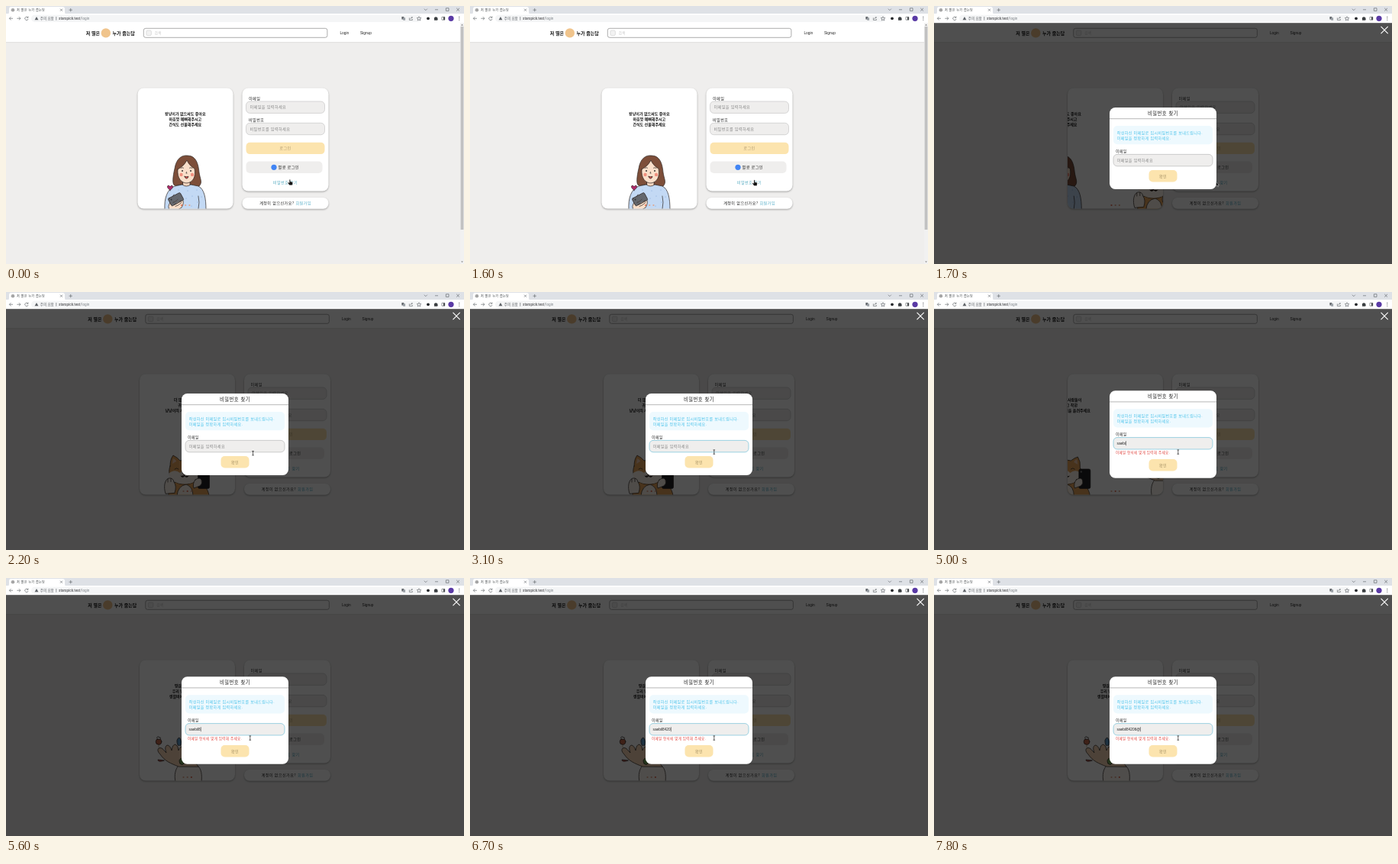
An HTML page that plays this animation: 600 px wide and 338 px high, repeating every 8 s.

```html
<!DOCTYPE html>
<html lang="ko">
<head>
<meta charset="utf-8">
<title>Password reset</title>
<style>
html, body { margin: 0; width: 100%; height: 100%; overflow: hidden; background: #efeeed; }
svg { display: block; width: 100%; height: 100%; }
text { font-family: "Noto Sans CJK KR", "Noto Sans CJK", "Noto Sans", sans-serif; letter-spacing: .08em; white-space: pre; }
.latin { font-family: "Liberation Sans", Arial, sans-serif; letter-spacing: 0; }
.ui { font-family: Roboto, "Noto Sans CJK KR", "Noto Sans CJK", sans-serif; letter-spacing: 0; }
.tight { letter-spacing: 0; font-weight: 700; }
.card { fill: #fff; filter: drop-shadow(0 1px 1.2px rgba(0, 0, 0, .32)); }
.bar { fill: #fff; filter: drop-shadow(0 .6px 1px rgba(0, 0, 0, .14)); }
.ink { stroke: #2b2422; stroke-width: .7; stroke-linejoin: round; stroke-linecap: round; }
.line { fill: none; stroke: #5f6368; stroke-width: .65; }
</style>
</head>
<body>
<svg id="stage" viewBox="0 0 600 338" preserveAspectRatio="none"></svg>
<script>
const LOOP = 8000;
const CARD_W = 125;
const EMAIL = 'saebil84206@';
// Time at which each character of EMAIL appears
const KEYS = [3600, 4400, 4600, 4900, 5000, 5500, 5600, 5900, 6300, 6700, 6900, 7800];

const text = (x, mid, size, str, fill = '#222', extra = '') =>
  `<text x="${x}" y="${mid + size * .36}" font-size="${size}" fill="${fill}" ${extra}>${str}</text>`;
const center = (x, mid, size, str, fill, extra = '') =>
  text(x, mid, size, str, fill, `text-anchor="middle" ${extra}`);
const box = (x, y, w, h, r, fill, extra = '') =>
  `<rect x="${x}" y="${y}" width="${w}" height="${h}" rx="${r}" fill="${fill}" ${extra}/>`;
const dot = (x, y, r, fill, extra = '') =>
  `<circle cx="${x}" cy="${y}" r="${r}" fill="${fill}" ${extra}/>`;
const path = (d, fill = 'none', extra = 'class="ink"') => `<path d="${d}" fill="${fill}" ${extra}/>`;
const line = d => path(d, 'none', 'class="line"');
const caption = (x, rows) =>
  rows.map((row, i) => center(x, 141.6 + i * 6.8, 5, row, '#111', 'class="tight"')).join('');

const FIELD = 'stroke="#c8c8c8" stroke-width=".7"';

function browserBar() {
  return box(0, 0, 600, 10.5, 0, '#dee1e6')
    + path('M2 10.5Q4 10.5 4 8V4Q4 1 7 1H74Q77 1 77 4V8Q77 10.5 79 10.5Z', '#fff', '')
    + box(0, 10, 600, 12.2, 0, '#fff')
    + dot(9, 5.3, 2.3, '#a5a5a5')
    + text(14, 5.4, 4.1, '저 별은 누가 줍는담', '#3c4043')
    + line('M71 3.7l3 3m0-3l-3 3M82.5 5.2h4.4m-2.2-2.2v4.4')
    + line('M547.8 3.7l2 2l2-2M562 4.8h4M576.4 2.8h3.6v3.6h-3.6zM590.2 2.8l3.8 3.8m0-3.8l-3.8 3.8')
    + box(33, 11.7, 512, 9.2, 4.6, '#f4f5f6')
    + line('M9 16.3H4.4m2.1-2.1l-2.1 2.1l2.1 2.1M14.4 16.3H19m-2.1-2.1l2.1 2.1l-2.1 2.1')
    + line('M28.6 14.9a2.2 2.2 0 1 0 .5 2M29 13.6v1.7h-1.8')
    + path('M37.6 18.3L40 14l2.4 4.3Z', '#5f6368', '')
    + text(44.8, 16.2, 4.6, '주의 요함', '#5f6368', 'class="ui"')
    + line('M65.8 14v4.6')
    + text(69, 16.2, 4.7, 'starspick.test<tspan fill="#80868b">/login</tspan>', '#303134', 'class="ui"')
    + box(518.4, 14, 2.9, 3.6, .4, '#5f6368') + box(520.2, 15.2, 2.9, 3.6, .4, '#9aa0a6')
    + line('M528.4 15.4v3h4v-1.4M529.8 17q.3-2 2.6-2m-1-1.1l1.1 1.1l-1.1 1.1')
    + line('M541 13.8l.8 1.7l1.9.2l-1.4 1.3l.4 1.9l-1.7-1l-1.7 1l.4-1.9l-1.4-1.3l1.9-.2z')
    + dot(553, 16.3, 1.9, '#26282b')
    + path('M561 15h1.3a.9.9 0 0 1 1.8 0h1.2v1.4a.9.9 0 0 1 0 1.6v.8h-4.3z', '#3c4043', '')
    + line('M571 14.4h3.8v3.8h-3.8z') + box(573, 14.4, 1.8, 3.8, 0, '#3c4043')
    + dot(583, 16.3, 3.6, '#5a3aa5')
    + [14.4, 16.3, 18.2].map(y => dot(593.8, y, .55, '#4d5156')).join('');
}

function header() {
  return box(-5, 22, 610, 25, 0, '#fff', 'class="bar"')
    + text(104.8, 35.4, 6, '저 별은', '#111', 'class="tight"')
    + dot(130.8, 35.4, 6.2, '#f0c48c')
    + text(139.6, 35.4, 6, '누가 줍는담', '#111', 'class="tight"')
    + box(180.3, 29.3, 240.6, 12, 2.6, '#fff', 'stroke="#8a8a8a" stroke-width=".7"')
    + box(183.8, 32, 6.6, 6.6, 1.6, '#f2f2f2', 'stroke="#c4c4c4" stroke-width=".5"')
    + text(194.8, 35.4, 4.4, '검색', '#c4c4c4')
    + text(437.4, 35.3, 4.8, 'Login', '#222', 'class="latin"')
    + text(464, 35.3, 4.8, 'Signup', '#222', 'class="latin"');
}

function woman() {
  const hair = 'M224 235C217 238 218 226 221 213C223 200 230 195 238 196C249 196 252 207 253 218'
    + 'C254 226 258 231 253 236C249 239 244 238 243 234L230 234Z';
  return caption(CARD_W / 2 + 172.3, ['왕냥이가 없으셔도 좋아요', '마음껏 예뻐해주시고', '간식도 선물해주세요'])
    + path(hair, '#7d4e39')
    + path('M232 229h9v7q-4.5 3-9 0z', '#f8d6bf')
    + path('M208 267C207 252 211 240 221 236L231 234Q236 238 242 234L252 236C260 240 262 252 262 267Z', '#c3d9f4')
    + [[226, 241], [238, 242], [250, 241], [244, 249], [256, 250], [236, 252], [251, 257], [243, 262], [212, 252]]
      .map(([x, y]) => dot(x, y, .55, '#7fa3d6')).join('')
    + path('M225 214C224 226 230 232 237 232C245 231 249 224 247 213C243 211 239 207 237 202C234 208 230 211 225 214Z', '#fadfca')
    + dot(229.5, 221, 2.2, '#f0907f') + dot(244, 221, 2.2, '#f0907f')
    + dot(231, 216, .9, '#222') + dot(242, 216, .9, '#222')
    + path('M229 212.3q2-1.3 3.5-.2M240.5 212.1q2-1 3.5.3M236.5 217.5l-.6 1.6h1.1')
    + path('M234 223.3q2.700.8 5 0q-.6 2.800-2.500 2.800t-2.500-2.800z', '#d84a48')
    + path('M252 249q2 8 0 17M220 247q-3 4-4 9')
    + path('M215 241.5C208 236 213 233.5 215 236.7C217 233.5 222 236 215 241.5Z', '#b0286a')
    + path('M213 262C215 255 219 250 226 250C233 251 234 258 230 264L225 267H214Z', '#fadfca')
    + `<g transform="rotate(-28 223 253)">${box(213.5, 247.5, 18, 11, 1.6, '#64676d', 'class="ink"')}${dot(217, 250.5, 1, '#34363a')}</g>`
    + path('M221 260q4-1 8-5M222 262.5q4-1 8-5M219 257.5q3-1 6-4', '#fadfca');
}

function cat() {
  return caption(237.5, ['더 많은 사람들이', '귀엽고 착한', '냥냥이의 사진을 올려주세요'])
    + path('M213 267C212 256 218 249 226 248H248C258 250 265 257 266 267Z', '#e9a65c')
    + path('M224 267Q225 254 236 252Q245 255 245 267Z', '#fff7ec')
    + path('M215 228Q215 219 219 214Q225 217 228 221Q235 219 241 221Q246 217 250 216Q254 222 253 230'
      + 'C258 242 248 252 234 252C220 252 210 242 215 228Z', '#e9a65c')
    + path('M219 218q4 2 4 4l-5 3zM249 219q-4 2-4 4l5 3z', '#f5cdb0', '')
    + path('M213 238Q221 231 228 237Q234 230 240 237Q247 231 255 238C253 247 245 251.500 234 251.500S215 247 213 238Z', '#fff7ec', '')
    + path('M221 232q2.500-2.500 5 0M241 232q2.500-2.500 5 0')
    + path('M231.500 237h5l-2.500 2.500zM234 240v1q-3 3-5 0m5 0q3 3 5 0', '#3a2a26')
    + path('M209 264C206 255 208 246 213 244Q219 243 220 249Q224 254 221 263Z', '#fff7ec')
    + path('M212 245v4M216 244.500v4')
    + box(251.500, 232, 15, 25.500, 2, '#202024', 'class="ink"')
    + dot(254.500, 235.500, 1.200, '#777')
    + path('M248 246q6-4 8 0q2 5-2 8l-8 3q-2-6 2-11z', '#fff7ec');
}

function paw() {
  return caption(237.5, ['병원비도 내주고', '우리 냥이 간식주고', '생활비에도 보태주세요'])
    + path('M222 267C220 258 222 250 226 246H251C256 250 257 258 256 267Z', '#fffaf2')
    + path('M226 247C216 243 208 240 202 231Q197 226 200 223Q204 221 208 227L210 229'
      + 'Q207 221 211 219Q215 219 217 226Q218 218 222 218Q226 220 226 226Q228 220 232 221'
      + 'Q238 228 242 234L252 247Z', '#f8d7b4')
    + path('M200 222v-5', 'none', 'stroke="#eee3cf" stroke-width="2"')
    + dot(200, 214.5, 3.8, '#c96a4d', 'class="ink"')
    + path('M198.5 211q-2-2 0-3q1.5-1 2 1q2-1 2 1t-2 1.5z', '#fff')
    + path('M225 219q-3-8 2-10q4 4 2 10z', '#5f9dcc')
    + path('M228 243q-3-5 2-7q5 2 3 7q-2 3-5 0z', '#79a95b')
    + path('M204 240q-5 1-5-2l8 1z', '#d95b4f');
}

function cards() {
  return box(172.5, 107.5, CARD_W, 158, 8, '#fff', 'class="card"')
    + `<g clip-path="url(#cardClip)"><g id="track"><g>${woman()}</g>`
    + `<g transform="translate(122.5)">${cat()}</g><g transform="translate(247.5)">${paw()}</g></g>`
    + [230, 235.2, 240.4].map(x => dot(x, 261, 1.1, '#e0a58c', 'class="page"')).join('') + '</g>'
    + box(309.5, 107.5, 113, 135, 8, '#fff', 'class="card"')
    + text(318, 121, 5.1, '이메일')
    + box(314.5, 125, 103, 15.4, 5, '#efeeed', FIELD)
    + text(319.5, 132.5, 5.1, '이메일을 입력하세요', '#858585')
    + text(318, 149.4, 5.1, '비밀번호')
    + box(314.5, 153.3, 103, 15.4, 5, '#efeeed', FIELD)
    + text(319.5, 161, 5.1, '비밀번호를 입력하세요', '#858585')
    + box(314.5, 178.7, 103, 15.4, 5, '#fce4ae')
    + center(366, 186.5, 5.1, '로그인', '#b09a70')
    + box(314.5, 203.6, 100, 15.4, 5, '#efeeed')
    + dot(351, 211.3, 3.6, '#4285f4')
    + text(356.6, 211.4, 5.1, '별콩 로그인')
    + center(366, 231.3, 5.1, '비밀번호 찾기', '#58acc2')
    + box(309.5, 251, 113, 14.8, 7, '#fff', 'class="card"')
    + center(366, 258.5, 5.1, '계정이 없으신가요? <tspan fill="#4fabc6">회원가입</tspan>');
}

function scrollbar() {
  return `<g id="scroll">${box(595, 22, 5, 316, 0, '#f1f1f1')}${box(595.6, 27, 3.8, 266, 0, '#c1c1c1')}`
    + path('M596.2 25.4l1.3-1.6l1.3 1.6zM596.2 334.5l1.3 1.6l1.3-1.6z', '#777', '') + '</g>';
}

function modal() {
  return '<g id="modal">' + box(0, 22, 600, 316, 0, '#000', 'opacity=".69"')
    + path('M585.5 26.9l9.2 9.2m0-9.2l-9.2 9.2', 'none', 'stroke="#fff" stroke-width="1.1"')
    + box(230, 133, 140, 107, 7.5, '#fff', 'id="panel"')
    + '<g id="upper">' + center(300, 140.5, 6.3, '비밀번호 찾기')
    + path('M230 147.7h140', 'none', 'stroke="#999" stroke-width=".7"')
    + box(235, 157, 130, 24.3, 5, '#eef9fe')
    + text(239.8, 166, 5, '작성하신 이메일로 임시비밀번호를 보내드립니다.', '#45c0ea')
    + text(239.8, 173, 5, '이메일을 정확하게 입력하세요.', '#45c0ea')
    + text(238, 190.3, 4.9, '이메일')
    + box(235, 194.4, 130, 15.4, 5, '#efeeed', 'id="field" stroke-width=".8"')
    + text(239.7, 202, 5.05, '이메일을 입력하세요', '#858585', 'id="hint"')
    + text(239.5, 202, 4.8, '', '#222', 'id="typed" class="latin"')
    + box(0, 199, .5, 6, 0, '#222', 'id="caret"') + '</g>'
    + text(238, 210.2, 4.5, '이메일 형식에 맞게 입력해 주세요.', '#e0413c', 'id="error"')
    + '<g id="confirm">' + box(281.5, 215, 37, 15.4, 5, '#fce4ae')
    + center(300, 222.8, 5, '확인', '#a08c60') + '</g></g>';
}

function cursors() {
  return '<g id="hand">' + path('M-.8-4q.9-.8 1.4.2v2.3l2.3.6q.9.3.7 1.3l-.5 2.8h-3.7l-2.2-2.8q0-1 1-.8l1 .7z', '#111',
    'stroke="#fff" stroke-width=".35"') + '</g>'
    + '<g id="arrow">' + path('M0 0v5.6l1.3-1.2l.9 2l.9-.4l-.9-2h1.7z', '#111', 'stroke="#fff" stroke-width=".35"') + '</g>'
    + '<g id="beam">' + path('M-1.3-2.7h2.6M0-2.7v5.4M-1.3 2.7h2.6', 'none', 'stroke="#222" stroke-width=".7"') + '</g>';
}

const stage = document.getElementById('stage');
stage.innerHTML = `<defs><clipPath id="cardClip">${box(172.5, 107.5, CARD_W, 158, 8, '#fff')}</clipPath></defs>`
  + box(0, 0, 600, 338, 0, '#efeeed')
  + `<g id="page">${header()}${cards()}</g>`
  + scrollbar() + modal() + cursors() + browserBar();

const el = {};
stage.querySelectorAll('[id]').forEach(node => { el[node.id] = node; });
const pages = stage.querySelectorAll('.page');

const show = (node, on) => node.setAttribute('visibility', on ? 'visible' : 'hidden');
const move = (node, x, y) => node.setAttribute('transform', `translate(${x} ${y})`);
const clamp = u => Math.min(1, Math.max(0, u));

// CSS "ease" curve, cubic-bezier(.25, .1, .25, 1)
function ease(u) {
  u = clamp(u);
  if (u === 0 || u === 1) return u;
  let lo = 0, hi = 1;
  for (let i = 0; i < 14; i++) {
    const s = (lo + hi) / 2;
    if (.75 * s * (1 - s) + s ** 3 < u) lo = s; else hi = s;
  }
  return .3 * lo * (1 - lo) ** 2 + 3 * lo * lo * (1 - lo) + lo ** 3;
}

function drawCursor(t, open) {
  const u = ease((t - 1800) / 600);
  const onField = u > .9;
  show(el.hand, !open);
  show(el.arrow, open && !onField);
  show(el.beam, open && onField);
  const nudge = t < 100 ? 0 : t < 400 ? .3 : .7;
  move(el.hand, 372 + nudge, 231.5 + nudge);
  move(el.arrow, 369.6 - 50 * u, 230.6 - 21 * u);
  move(el.beam, 369.8 - 50 * u, 230.6 - 21 * u);
}

function drawForm(t, open) {
  const count = KEYS.filter(k => k <= t).length;
  const grown = open && count > 0;
  el.panel.setAttribute('y', grown ? 129.2 : 133);
  el.panel.setAttribute('height', grown ? 114.5 : 107);
  move(el.upper, 0, grown ? -3.8 : 0);
  move(el.confirm, 0, grown ? 4 : 0);
  el.field.setAttribute('stroke', t >= 2500 ? '#86c8dc' : '#c0c0c0');
  show(el.hint, open && !count);
  show(el.error, grown);
  el.typed.textContent = EMAIL.slice(0, count);
  const blink = grown && (t - KEYS[count - 1]) % 1000 < 500;
  show(el.caret, blink);
  if (grown) el.caret.setAttribute('x', 239.7 + el.typed.getComputedTextLength());
}

function draw(time) {
  const t = Math.floor(time / 100) * 100;
  const open = t >= 1700;
  const slide = (open ? ease((t - 1535) / 500) : 0) + ease((t - 4855) / 500);
  move(el.page, open ? 2.5 : 0, 0);
  move(el.track, -CARD_W * slide, 0);
  pages.forEach((p, i) => p.setAttribute('fill', i === Math.ceil(slide - .7) ? '#e0694f' : '#e0a58c'));
  show(el.scroll, !open);
  el.modal.setAttribute('display', open ? 'inline' : 'none');
  drawForm(t, open);
  drawCursor(t, open);
}

const start = performance.now();
function tick() {
  draw((performance.now() - start) % LOOP);
  requestAnimationFrame(tick);
}
tick();
</script>
</body>
</html>
```
